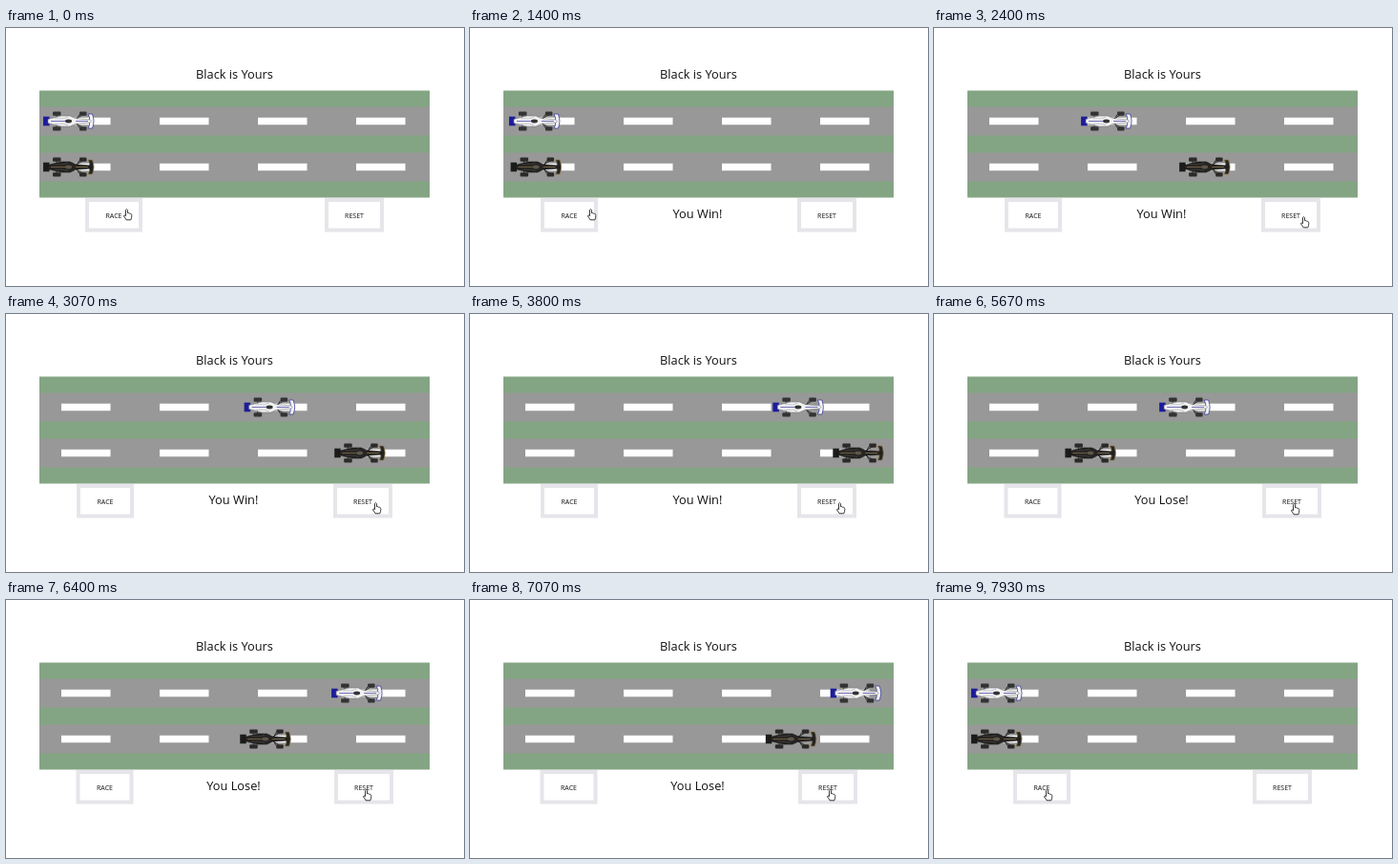
Recreate the animation shown at these times as an HTML page. Size 480x270 px, loop 8 s.

```html
<!DOCTYPE html>
<html lang="en">
<head>
<meta charset="utf-8">
<title>Car race</title>
<style>
  html, body { margin: 0; width: 100%; height: 100%; overflow: hidden; background: #fff; }
  svg { display: block; width: 480px; height: 270px; }
  text { font: 12.8px "Open Sans", "Noto Sans", sans-serif; text-anchor: middle; fill: #111; }
  .button rect { fill: #fff; stroke: #e6e5ea; stroke-width: 4; }
  .button text { font-size: 7px; }
  #cursor path { fill: #fff; stroke: #222; stroke-width: .9; stroke-linejoin: round; }
</style>
</head>
<body>
<svg viewBox="0 0 480 270">
  <text x="239.5" y="53">Black is Yours</text>
  <rect x="35" y="65.5" width="409" height="112" fill="#83a583"/>
  <path d="M35 82.5h409v30h-409zM35 130.5h409v30h-409z" fill="#989898"/>
  <path d="M58 97.5H444M58 145.5H444" stroke="#fff" stroke-width="7.4" stroke-dasharray="51.5 51.5"/>
  <g id="cars"></g>
  <g id="race" class="button">
    <rect x="-28" y="180" width="56" height="31.5"/><text y="199">RACE</text>
  </g>
  <g id="reset" class="button">
    <rect x="-29" y="180" width="58" height="31.5"/><text y="199">RESET</text>
  </g>
  <text id="result" x="238.5" y="198.5"></text>
  <g id="cursor">
    <path id="hand" d="M-1 7V1Q0-.8 1 1V4.2Q2.2 3.6 2.8 4.6Q4.2 4.2 4.6 5.4Q5.4 5.4 5.3 7Q5.3 9 4.3 11.3H-.4Q-1.6 9.3-3 7.4Q-2.8 5.6-1 7Z"/>
    <path id="arrow" d="M0 0V7.6L1.8 6L3 8.8L4.3 8.2L3.1 5.5H5.4Z"/>
  </g>
</svg>
<script>
const LOOP = 8000, FPS = 15, HOME = 38, TRACK = 346;
const el = id => document.getElementById(id);

const paints = [
  { body: "#f2f2f4", edge: "#777", wing: "#1c1c9c", trim: "#3a3a9a", tyre: "#333", seat: "#333", side: "#c4c5cc" },
  { body: "#252422", edge: "#111", wing: "#1d1c1b", trim: "#8f7850", tyre: "#2b2a28", seat: "#5c5548", side: "#3d3a36" }
];

function carMarkup(p) {
  const wheels = [[11, 8.5], [39, 7.5]].map(([x, w]) => [-10, 5.8].map(y =>
    `<rect x="${x}" y="${y}" width="${w}" height="4.2" rx="1" fill="${p.tyre}"/>`).join("")).join("");
  return `<g>
    <path d="M15-7V7M43-7L34-1.5M43 7L34 1.5M39-7L36-2M39 7L36 2" stroke="${p.tyre}" fill="none"/>
    ${wheels}
    <path d="M1-4.8H7.5V4.8H1Z" fill="${p.wing}"/>
    <path d="M48-7.5H52.5Q54-3 54 0Q54 3 52.5 7.5H48L49.5 4V-4Z" fill="${p.body}" stroke="${p.trim}" stroke-width=".8"/>
    <path d="M6-2L12-3.6L20-5.5H29L35-2.8L50-1.6Q53 0 50 1.6L35 2.8L29 5.5H20L12 3.6L6 2Z"
      fill="${p.body}" stroke="${p.edge}" stroke-width=".6"/>
    <path d="M13-2.6H22L27-4.3M13 2.6H22L27 4.3" fill="none" stroke="${p.side}"/>
    <path d="M9 0H24M35 0H48" stroke="${p.trim}" stroke-width=".7"/>
    <ellipse cx="27.5" rx="3.5" ry="1.9" fill="${p.seat}"/>
  </g>`;
}
el("cars").innerHTML = paints.map(carMarkup).join("");
const cars = el("cars").children;

// durations: white car, black car
const races = [
  { start: 1340, end: 4060, durations: [4900, 2900], text: "You Win!", raceX: 104, resetX: 374 },
  { start: 4710, end: 7330, durations: [2900, 4900], text: "You Lose!", raceX: 103.5, resetX: 375 }
];
const idle = { text: "", raceX: 113, resetX: 365 };

// time, x, y of the pointer tip
const path = [
  [0, 126.5, 189.5], [1470, 126.5, 189.5], [2130, 387.5, 197.5], [4200, 387.5, 197.5],
  [4670, 118.5, 198.5], [4780, 118.5, 198.5], [5095, 377.5, 198.5], [7400, 377.5, 198.5],
  [7930, 118.5, 198.5], [LOOP, 118.5, 198.5]
];

// cubic-bezier(.25, .1, .25, 1)
function ease(p) {
  if (p >= 1) return 1;
  let lo = 0, hi = 1, u;
  const curve = (a, b) => 3 * u * (1 - u) ** 2 * a + 3 * u * u * (1 - u) * b + u ** 3;
  for (let i = 0; i < 24; i++) {
    u = (lo + hi) / 2;
    if (curve(.25, .25) < p) lo = u; else hi = u;
  }
  return curve(.1, 1);
}

function pointerAt(t) {
  const i = path.findIndex(k => k[0] > t);
  const [t0, x0, y0] = path[i - 1], [t1, x1, y1] = path[i];
  const s = (t - t0) / (t1 - t0), e = s * s * (3 - 2 * s);
  return [x0 + (x1 - x0) * e, y0 + (y1 - y0) * e];
}

const move = (node, x, y) => node.setAttribute("transform", `translate(${x} ${y})`);

function draw(t) {
  const race = races.find(r => t >= r.start && t < r.end);
  const view = race || idle;
  [97.5, 145.5].forEach((y, i) => {
    const run = race ? ease((t - race.start) / race.durations[i]) : 0;
    move(cars[i], HOME + TRACK * run, y);
  });
  move(el("race"), view.raceX, 0);
  move(el("reset"), view.resetX, 0);
  el("result").textContent = view.text;

  const [x, y] = pointerAt(t);
  const over = Math.abs(x - view.raceX) < 30 || Math.abs(x - view.resetX) < 31;
  move(el("cursor"), x, y);
  el("hand").style.display = over ? "" : "none";
  el("arrow").style.display = over ? "none" : "";
}

const begin = performance.now();
function tick() {
  const t = Math.max(0, performance.now() - begin) % LOOP;
  draw(Math.floor(t * FPS / 1000 + .05) * 1000 / FPS % LOOP);
  requestAnimationFrame(tick);
}
tick();
</script>
</body>
</html>
```
